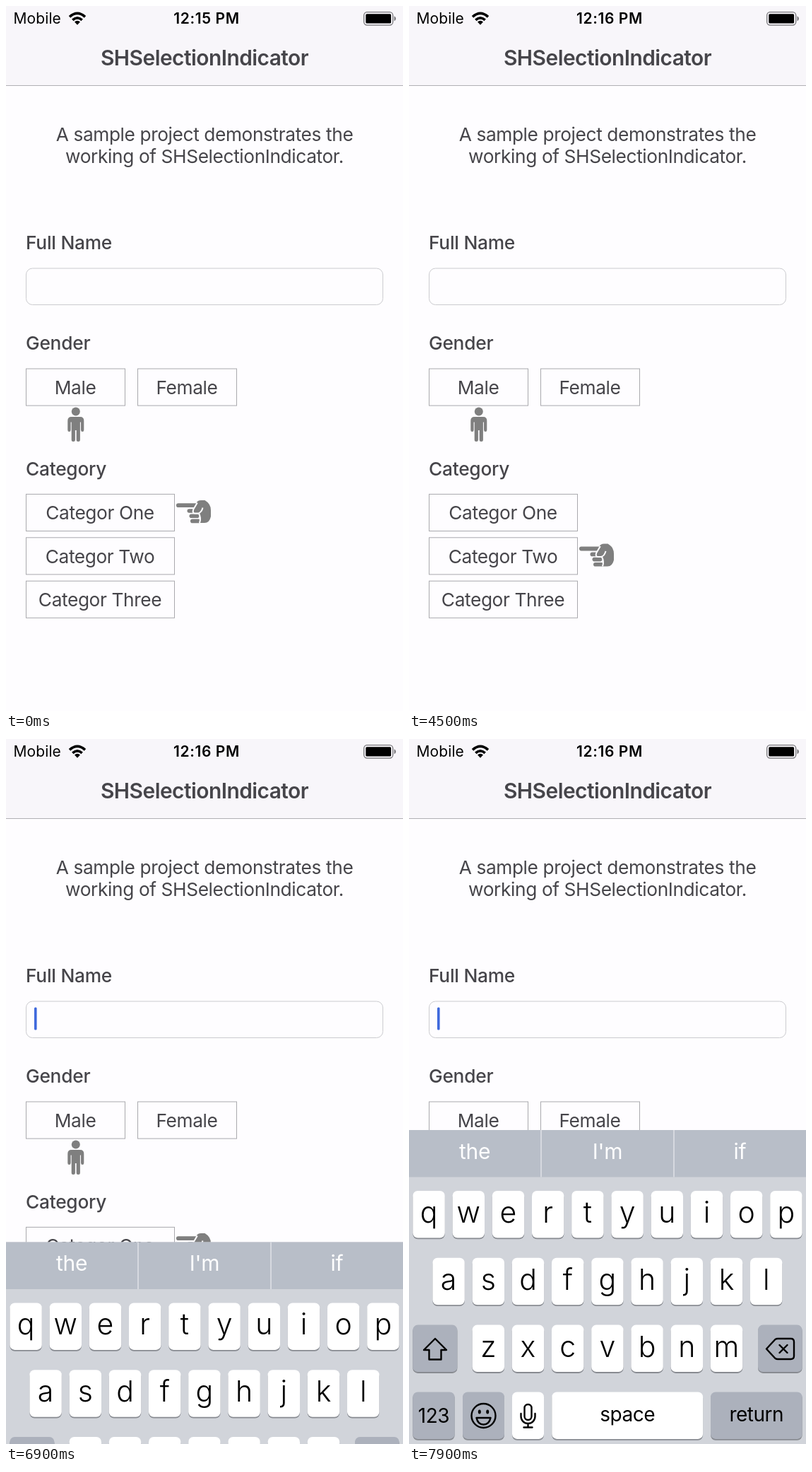
Write an HTML page that moves like this. It is 562x997 px and loops after 8000 ms.

```html
<!DOCTYPE html>
<html lang="en">
<head>
<meta charset="utf-8">
<title>Selection indicator</title>
<style>
  html, body { margin: 0; width: 100%; height: 100%; overflow: hidden; background: #fefdff; }
  svg { display: block; width: 100%; height: 100%; }
  text { font: 400 26.3px Inter, "Open Sans", sans-serif; font-optical-sizing: none; letter-spacing: -.4px; fill: #46454a; }
  .mid { text-anchor: middle; }
  .label { font-weight: 500; letter-spacing: -.25px; }
  .title { font-size: 29.9px; font-weight: 600; letter-spacing: -.54px; }
  .status { font-size: 21px; letter-spacing: .1px; fill: #000; }
  .clock { font-weight: 600; letter-spacing: .6px; }
  .box { fill: none; stroke: #a9a9ad; }
  .icon { fill: #7f7f7f; }
  .gap { fill: none; stroke: #fefdff; stroke-width: 2; stroke-linejoin: round; }
  .line { fill: none; stroke: #000; stroke-width: 2.4; stroke-linejoin: round; stroke-linecap: round; }
  .hint { font-size: 30px; letter-spacing: -.3px; fill: #fff; }
  .key { font-size: 41px; font-weight: 300; letter-spacing: 0; fill: #000; }
  .word { font-size: 28px; letter-spacing: -.5px; fill: #000; }
</style>
</head>
<body>
<svg viewBox="0 0 562 997" preserveAspectRatio="none">
  <path fill="#f8f6fa" d="M0 0H562V112H0z"/>
  <path stroke="#b1b0b4" d="M0 112.5H562"/>

  <text class="status" x="10.5" y="25.3">Mobile</text>
  <text class="status clock mid" id="clock" x="284" y="25.3"></text>
  <g fill="none" stroke="#000" stroke-width="3.6">
    <path d="M90 15.4Q101 5.4 112 15.4"/>
    <path d="M94.3 19.8Q101 13.8 107.7 19.8"/>
  </g>
  <path d="M97 22.6Q101 19 105 22.6L101 26.8z"/>
  <rect x="506.7" y="8.7" width="41" height="18.4" rx="4.5" fill="none" stroke="#77767a" stroke-width="1.3"/>
  <rect x="509.3" y="11.3" width="35.8" height="13.2" rx="1.5"/>
  <path fill="#77767a" d="M549.5 14.3q2.5 1 2.5 3.5t-2.5 3.5z"/>

  <text class="title mid" x="281" y="84.3">SHSelectionIndicator</text>
  <text class="mid" x="281" y="190.5">A sample project demonstrates the</text>
  <text class="mid" x="281" y="221.5">working of SHSelectionIndicator.</text>
  <text class="label" x="28" y="344.3">Full Name</text>
  <text class="label" x="28" y="486.3">Gender</text>
  <text class="label" x="28" y="663.8">Category</text>
  <rect class="box" x="28.5" y="371" width="505" height="51.5" rx="9" style="stroke:#cbcbcf"/>
  <rect id="caret" x="40" y="379.5" width="3.6" height="32" rx="1.5" fill="#3f69dc"/>
  <g id="buttons"></g>

  <g id="person" class="icon">
    <circle cx="98.8" cy="573.6" r="6"/>
    <path d="M92.5 581H105Q110.3 581 110.3 586.5V599.5Q110.3 602 108.2 602T106 599.5V588.5H104.9V613.5Q104.9 616 102.3 616T99.7 613.5V600H97.9V613.5Q97.9 616 95.3 616T92.7 613.5V588.5H91.6V599.5Q91.6 602 89.4 602T87.3 599.5V586.5Q87.3 581 92.5 581z"/>
  </g>
  <g id="hand" class="icon">
    <rect x="241" y="703.2" width="30" height="5.8" rx="2.8"/>
    <rect x="256.5" y="711.2" width="14" height="5.6" rx="2.8"/>
    <rect x="259.5" y="718.4" width="14" height="5.6" rx="2.8"/>
    <rect x="261" y="725.5" width="14" height="5.7" rx="2.8"/>
    <path d="M265 714L269.5 703Q271 699 276 699H281.5Q290 704 290 713V722Q288 731 281 731H273.5Q277 724 272 717.5H268Q264 717.5 265 714z"/>
    <path class="gap" d="M270.8 702.5L265.2 712Q263.5 717.6 267.5 717.6H272Q277 716 278.5 709.5M273 717.6Q276.5 724 274 731"/>
  </g>

  <g id="keyboard">
    <path fill="#d1d4da" d="M0 0H562V444H0z"/>
    <path fill="#b8bec8" d="M0 0H562V66.5H0z"/>
    <path stroke="#dfe2e7" stroke-width="1.5" d="M187 0V66.5M375 0V66.5"/>
    <text class="hint mid" x="93" y="41">the</text>
    <text class="hint mid" x="281" y="41">I'm</text>
    <text class="hint mid" x="468.5" y="41">if</text>
    <g id="keys"></g>
    <path class="line" d="M37 295L53 311H45.5V324.5H28.5V311H21z"/>
    <path class="line" d="M506 309.5L518.5 296Q520 295 522 295H540.5Q545 295 545 299.5V319.5Q545 324 540.5 324H522Q520 324 518.5 323zM524.5 304L535.5 315M535.5 304L524.5 315"/>
    <circle class="line" cx="105.5" cy="404" r="17"/>
    <ellipse cx="99.8" cy="398.5" rx="2" ry="3"/>
    <ellipse cx="111.2" cy="398.5" rx="2" ry="3"/>
    <path class="line" d="M95.5 407H115.5Q113.5 416.5 105.5 416.5T95.5 407z"/>
    <path class="line" d="M163.5 393a5 5 0 0 1 10 0V405a5 5 0 0 1 -10 0zM158.5 401V405a10 10 0 0 0 20 0V401M168.5 415V420.5M162.5 420.5H174.5"/>
  </g>
</svg>
<script>
const LOOP = 8000, STEP = 100;
const $ = id => document.getElementById(id);

function add(parent, tag, attrs, text = "") {
  const el = document.createElementNS("http://www.w3.org/2000/svg", tag);
  for (const name in attrs) el.setAttribute(name, attrs[name]);
  el.textContent = text;
  return parent.appendChild(el);
}

function button(label, x, y, width) {
  add($("buttons"), "rect", { class: "box", x, y, width, height: 52.1 });
  return add($("buttons"), "text", { class: "mid", x: x + width / 2 - .5, y: y + 35.8 }, label);
}

const male = button("Male", 28.5, 513, 140);
const female = button("Female", 186.5, 513, 140);
const [one, two, three] = ["One", "Two", "Three"].map(
  (name, i) => button("Categor " + name, 28.5, 690.4 + i * 61.4, 210));

const rowTop = row => 86 + row * 94.8;

function key(label, x, row, width, fill = "#fff", style = "key", baseline = 45) {
  const y = rowTop(row), shape = { x, width, height: 66.5, rx: 7 };
  add($("keys"), "rect", { ...shape, y: y + 1.8, fill: "#888b91" });
  add($("keys"), "rect", { ...shape, y, fill });
  add($("keys"), "text", { class: style + " mid", x: x + width / 2, y: y + baseline }, label);
}

["qwertyuiop", "asdfghjkl", "zxcvbnm"].forEach((letters, row) =>
  [...letters].forEach((c, i) => key(c, [5.4, 33.4, 89.6][row] + i * 56.2, row, 45.4)));
const GREY = "#acb1bc";
key("", 5.4, 2, 63, GREY);
key("", 494, 2, 62.6, GREY);
key("123", 5.4, 3, 59.2, GREY, "word", 44);
key("", 76, 3, 59, GREY);
key("", 146, 3, 45, "#fff");
key("space", 202.3, 3, 213.8, "#fff", "word", 42);
key("return", 427, 3, 129.6, GREY, "word", 42);

// Each tap dims a label, then slides an indicator until `end`.
const taps = [
  { label: female, start: 1500, end: 2000, part: "person", from: 0, to: 158 },
  { label: male, start: 3100, end: 3600, part: "person", from: 158, to: 0 },
  { label: two, start: 4100, end: 4500, part: "hand", from: 0, to: 61.4 },
  { label: three, start: 5000, end: 5400, part: "hand", from: 61.4, to: 122.8 },
  { label: one, start: 5800, end: 6300, part: "hand", from: 122.8, to: 0 },
];

const clamp = v => Math.min(1, Math.max(0, v));
const smooth = v => v * v * (3 - 2 * v);

// Critically damped spring: 1 at rest, settling to 0.
function spring(seconds) {
  const a = 18.26 * Math.max(0, seconds);
  return (1 + a) * Math.exp(-a);
}

function caretOpacity(t) {
  if (t < 6800) return 0;
  return t < 7600 ? clamp((7500 - t) / 200) : clamp((t - 7700) / 200);
}

function draw(now) {
  const t = Math.floor(now % LOOP / STEP) * STEP;
  const shift = { person: 0, hand: 0 };
  for (const { label, start, end, part, from, to } of taps) {
    const dim = t >= start && t < end;
    label.setAttribute("opacity", dim ? .2 + .8 * clamp((t - start - 50) / 350) : 1);
    if (t >= start) shift[part] = from + (to - from) * smooth(clamp((t - end + 330) / 330));
  }
  $("person").setAttribute("transform", `translate(${shift.person} 0)`);
  $("hand").setAttribute("transform", `translate(0 ${shift.hand})`);
  $("clock").textContent = t < 500 ? "12:15 PM" : "12:16 PM";
  $("caret").setAttribute("opacity", caretOpacity(t));
  $("keyboard").setAttribute("transform", `translate(0 ${553 + 444 * spring((t - 6780) / 1000)})`);
}

const begin = performance.now();
function tick() {
  draw(performance.now() - begin);
  requestAnimationFrame(tick);
}
tick();
</script>
</body>
</html>
```
